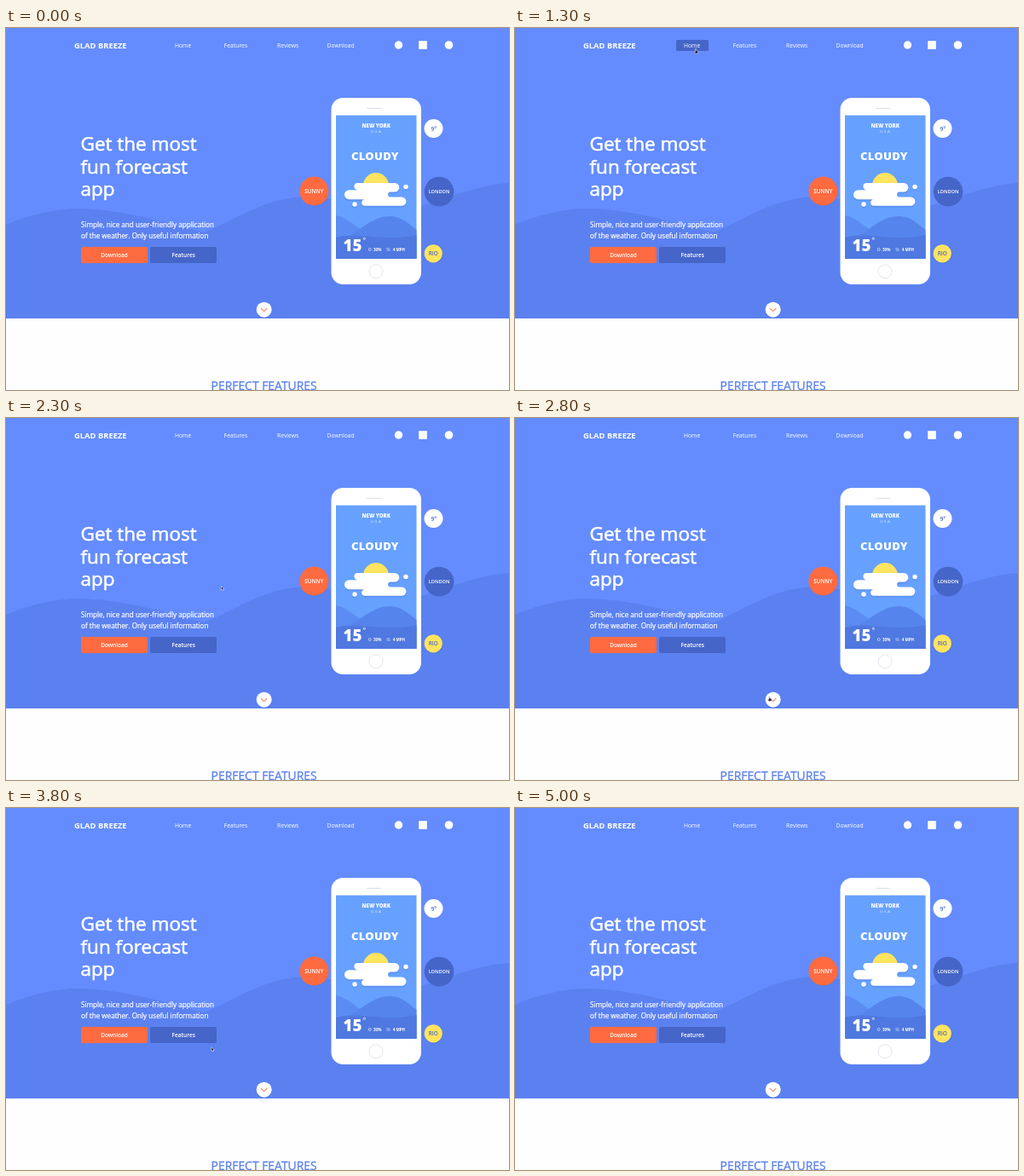
Write an HTML page that moves like this. It is 590 px wide and 425 px high and loops after 5300 ms.

```html
<!DOCTYPE html>
<html lang="en">
<head>
<meta charset="utf-8">
<title>Glad Breeze</title>
<style>
  html, body { margin: 0; width: 100%; height: 100%; overflow: hidden; background: #fefefe; }
  svg { display: block; width: 590px; height: 425px; font-family: "Open Sans", "Noto Sans", sans-serif; }
  text { fill: #fff; }
  .mid { text-anchor: middle; }
  .semi { font-weight: 600; }
  .bold { font-weight: 700; }
  .heavy { font-weight: 800; }
  .navy { fill: #4565c8; }
  .title { font-size: 22.5px; stroke: #fff; stroke-width: .6px; }
  .lead { font-size: 8.15px; stroke: #fff; stroke-width: .22px; }
  .nav { font-size: 6.8px; }
  .btn { font-size: 6.5px; font-weight: 600; }
  .next { font-size: 13.9px; fill: #5b81f0; stroke: #5b81f0; stroke-width: .3px; }
</style>
</head>
<body>
<svg viewBox="0 0 590 425">
  <defs>
    <linearGradient id="warm">
      <stop offset="0" stop-color="#ffe45f"/>
      <stop offset=".4" stop-color="#ffea85"/>
      <stop offset="1" stop-color="#fff7d8"/>
    </linearGradient>
    <clipPath id="screen"><rect x="387" y="102.5" width="94.5" height="168.5"/></clipPath>
    <g id="cloud">
      <path d="M412.5 182H456a5.3 5.3 0 0 1 0 10.6H451a2.9 2.9 0 0 0 0 5.8H464.2a5.2 5.2 0 0 1 0 10.4H421a3.8 3.8 0 0 1 0-7.6H402.5a5.5 5.5 0 0 1 0-11H412.5a4.1 4.1 0 0 1 0-8.2Z"/>
      <circle cx="469" cy="186.5" r="2.7"/>
      <circle cx="409" cy="207" r="2.7"/>
    </g>
  </defs>

  <!-- hero -->
  <rect width="590" height="341" fill="#648cff"/>
  <path fill="#5b81f0" d="M0 231C30 218 60 212 85 212C130 212 180 226 232 240C265 228 300 200 350 198C392 198 440 222 490 208C525 197 560 183 590 182V341H0Z"/>

  <text class="bold" x="80" y="23.5" font-size="9.4">GLAD BREEZE</text>
  <rect id="homeBox" x="189" y="14" width="38" height="13" rx="1.5" fill="#4565c8"/>
  <g class="nav">
    <text x="198" y="22.9">Home</text>
    <text x="255.8" y="22.9">Features</text>
    <text x="318" y="22.9">Reviews</text>
    <text x="376.6" y="22.9">Download</text>
  </g>
  <g fill="#fff">
    <circle cx="460.5" cy="20" r="4.7"/>
    <rect x="484.2" y="15.2" width="9.6" height="9.6"/>
    <circle cx="519.5" cy="20" r="4.8"/>
  </g>

  <g class="title">
    <text x="87.5" y="144.3">Get the most</text>
    <text x="87.5" y="170.6">fun forecast</text>
    <text x="87.5" y="196.9">app</text>
  </g>
  <g class="lead">
    <text x="88" y="234">Simple, nice and user-friendly application</text>
    <text x="88" y="246.6">of the weather. Only useful information</text>
  </g>
  <rect x="88" y="257" width="78" height="19" rx="2" fill="#ff6b40"/>
  <text class="btn mid" x="127" y="269">Download</text>
  <rect id="featBox" x="169" y="257" width="78" height="19" rx="2"/>
  <text id="featText" class="btn mid" x="208.2" y="269">Features</text>

  <circle cx="303" cy="331.4" r="9.2" fill="#3c5cc0" opacity=".2"/>
  <circle cx="302.7" cy="330.7" r="9" fill="#fff"/>
  <path d="M298.9 329.2L302.6 332.6L306.3 329.2" fill="none" stroke="#ff7a55" stroke-width="1.1"/>

  <!-- phone -->
  <rect x="381.5" y="82" width="105.5" height="219" rx="14" fill="#fff"/>
  <path d="M423.5 94.3H440" stroke="#dfe2ea" stroke-width="1.2" stroke-linecap="round"/>
  <circle cx="434" cy="285.8" r="8" fill="none" stroke="#e0e3ec" stroke-width=".9"/>
  <g clip-path="url(#screen)">
    <rect x="387" y="102" width="95" height="170" fill="#66a1ff"/>
    <path fill="#5b8cf3" d="M387 220C403 223 412 236 432 247V272H387Z"/>
    <path fill="#5585ec" d="M387 250C410 246 425 221 450 221C466 221 474 232 482 237V272H387Z"/>
    <path fill="#4f78e0" d="M387 246C415 238 440 252 482 243V272H387Z"/>
    <circle cx="434" cy="185" r="15" fill="#ffe45f"/>
    <use href="#cloud" y="1.6" fill="#4f82e8" opacity=".55"/>
    <use href="#cloud" fill="#fff"/>
    <text class="heavy mid" x="434.2" y="116.5" font-size="6.1">NEW YORK</text>
    <text class="mid" x="434.3" y="123.2" font-size="4" letter-spacing=".5" opacity=".9">U.S.A</text>
    <text class="heavy" x="405" y="155.2" font-size="13" letter-spacing=".3">CLOUDY</text>
    <text class="heavy" x="395.6" y="261.5" font-size="18.7">15</text>
    <g fill="none" stroke="#fff" stroke-width=".7">
      <circle cx="420.3" cy="247.3" r="1.1"/>
      <circle cx="426.7" cy="260" r="1.5" opacity=".8"/>
      <path d="M446 259H450.3M446.6 261H451" opacity=".8"/>
    </g>
    <text class="bold" x="431" y="261.6" font-size="4.6">30%</text>
    <text class="bold" x="453.8" y="261.6" font-size="4.5">4 MPH</text>
  </g>

  <!-- badges -->
  <g fill="#3c5cc0" opacity=".2">
    <circle cx="501.7" cy="118.6" r="11"/>
    <circle cx="361.6" cy="192" r="17.1"/>
    <circle cx="508.2" cy="192.6" r="17.3"/>
    <circle cx="502" cy="265.7" r="10.8"/>
  </g>
  <circle cx="501.5" cy="118" r="11" fill="#fff"/>
  <text class="semi mid navy" x="501.8" y="120.6" font-size="6.8">9°</text>
  <circle cx="361.4" cy="191.4" r="17" fill="#ff6b40"/>
  <text class="semi mid" x="361.2" y="193.8" font-size="6.4">SUNNY</text>
  <circle cx="508" cy="192" r="17.3" fill="#4565c8"/>
  <text class="semi mid" x="508" y="194.1" font-size="5.6">LONDON</text>
  <circle cx="501.3" cy="264.8" r="10.6" fill="#ffe45f"/>
  <text class="semi mid navy" x="501.2" y="267.2" font-size="6.4">RIO</text>

  <text class="mid next" x="302.6" y="425.4">PERFECT FEATURES</text>

  <g id="cursor" stroke="#fff" stroke-width=".5" fill="#1b1f33">
    <path id="arrow" d="M0 0V4.6L1.2 3.6L2 5.2L2.8 4.8L2 3.3H3.4Z"/>
    <path id="hand" d="M-.2 0H.8V2L3 2.6V4.2L2.3 5.6H-.3L-1.6 3.4L-1 2.9L-.2 3.5Z"/>
  </g>
</svg>
<script>
  const LOOP = 5300, STEP = 100, ENTER = 300, LEAVE = 5000;
  // time, x, y of the pointer tip
  const path = [
    [300, 296, 418], [600, 262, 215], [900, 230.5, 43.5], [1200, 215, 27],
    [1500, 205, 19], [1800, 205, 19], [2300, 252.5, 197.5], [2800, 298, 327],
    [3100, 300, 329], [3400, 284.5, 320], [3900, 230, 271], [4200, 230, 271],
    [4300, 238.5, 274.5], [4800, 258, 400], [4900, 262, 424]
  ];
  const el = id => document.getElementById(id);
  const show = (id, on) => { el(id).style.display = on ? "" : "none"; };
  const inside = (p, x, y, w, h) => p.x >= x && p.x <= x + w && p.y >= y && p.y <= y + h;

  function pointAt(t) {
    let i = 1;
    while (i < path.length - 1 && path[i][0] < t) i++;
    const [t0, x0, y0] = path[i - 1], [t1, x1, y1] = path[i];
    const k = Math.min(1, Math.max(0, (t - t0) / (t1 - t0)));
    return { x: x0 + (x1 - x0) * k, y: y0 + (y1 - y0) * k };
  }

  function draw(time) {
    const t = Math.floor((time % LOOP) / STEP) * STEP;
    const active = t >= ENTER && t < LEAVE;
    const p = pointAt(t);
    const home = active && inside(p, 189, 14, 38, 13);
    const feat = active && inside(p, 169, 257, 78, 19);
    const down = Math.hypot(p.x - 302.7, p.y - 330.7) < 9;
    const link = home || feat || down;

    show("cursor", active);
    show("arrow", !link);
    show("hand", link);
    show("homeBox", home);
    el("cursor").setAttribute("transform", `translate(${p.x} ${p.y})`);
    el("featBox").style.fill = feat ? "url(#warm)" : "#4565c8";
    el("featText").style.fill = feat ? "#4565c8" : "#fff";
  }

  const start = performance.now();
  function tick() {
    draw(performance.now() - start);
    requestAnimationFrame(tick);
  }
  tick();
</script>
</body>
</html>
```
